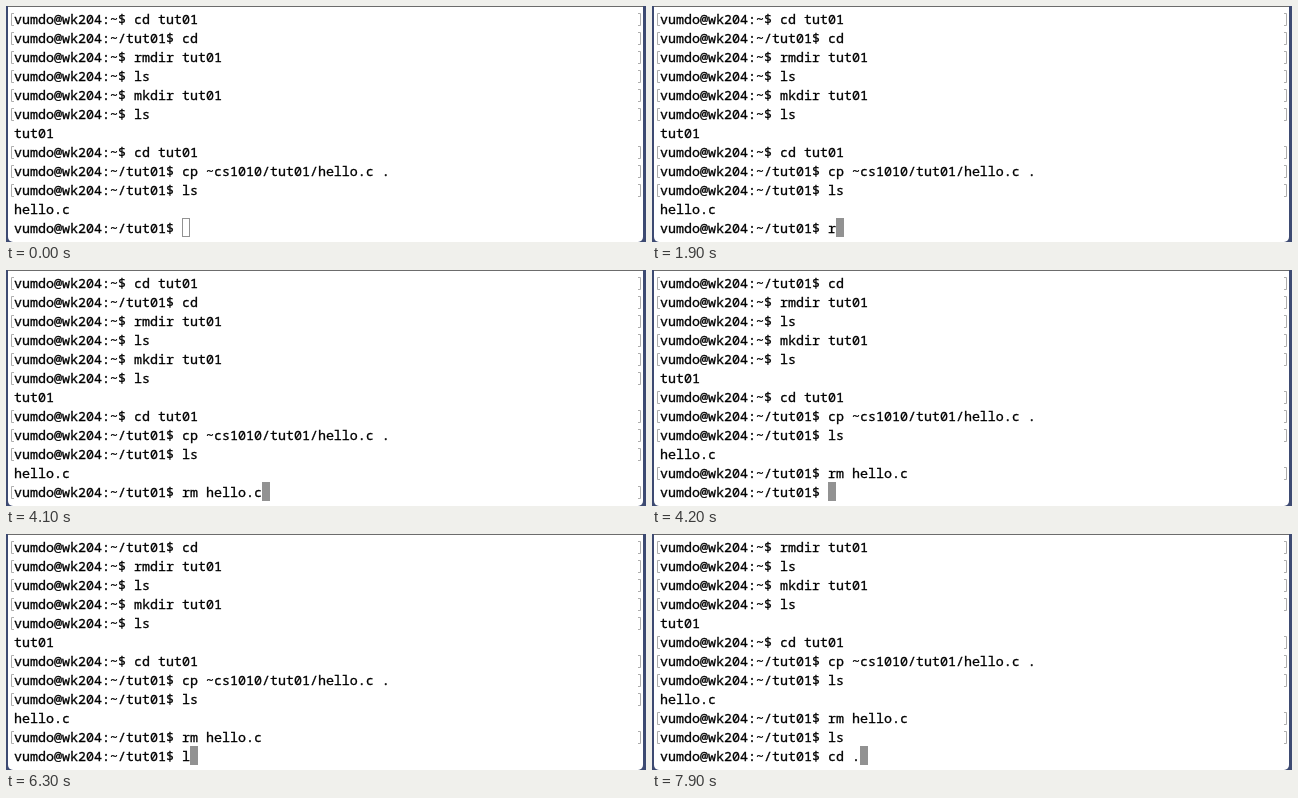
Animation, 640 px wide and 236 px high, one loop 8000 ms. Source, as an HTML page with a canvas:

```html
<!DOCTYPE html>
<html lang="en">
<head>
<meta charset="utf-8">
<title>Terminal session</title>
<style>
  html, body { margin: 0; width: 100%; height: 100%; overflow: hidden; }
  canvas { display: block; width: 640px; height: 236px; }
</style>
</head>
<body>
<canvas id="screen" width="640" height="236"></canvas>
<script>
const ctx = document.getElementById('screen').getContext('2d');
const LOOP = 8000, CELL = 8, ROW = 19, LEFT = 8, TOP = 3, ROWS = 12;
const HOST = 'vumdo@wk204:';
const home = cmd => ({ text: `${HOST}~$ ${cmd}`, marked: true });
const tut = cmd => ({ text: `${HOST}~/tut01$ ${cmd}`, marked: true });
const out = text => ({ text, marked: false });

const history = [
  home('cd tut01'), tut('cd'), home('rmdir tut01'), home('ls'),
  home('mkdir tut01'), home('ls'), out('tut01'), home('cd tut01'),
  tut('cp ~cs1010/tut01/hello.c .'), tut('ls'), out('hello.c')
];

// [time, key]: '<' erases, '!' accepts the line, '\n' opens a new prompt
const keys = [
  [1900, 'r'], [2000, 'm'], [2200, ' '], [2400, 'h'], [2600, 'e'],
  [2900, 'l'], [3100, 'l'], [3300, 'o'], [3600, '.'], [3800, 'c'],
  [4100, '!'], [4200, '\n'],
  [5400, 's'], [6000, '<'], [6300, 'l'], [6400, 's'], [6500, '\n'],
  [7500, 'c'], [7600, 'd'], [7800, ' '], [7900, '.']
];
const FOCUS_TIME = 100;

function sessionAt(time) {
  const lines = history.slice();
  let input = '', accepted = false;
  for (const [at, key] of keys) {
    if (at > time) break;
    if (key === '<') input = input.slice(0, -1);
    else if (key === '!') accepted = true;
    else if (key === '\n') {
      lines.push(tut(input));
      input = '';
      accepted = false;
    } else input += key;
  }
  lines.push({ ...tut(input), marked: accepted });
  return lines.slice(-ROWS);
}

function drawWindow() {
  ctx.fillStyle = '#3d4a72';
  ctx.fillRect(0, 0, 640, 236);
  ctx.fillStyle = '#fff';
  ctx.beginPath();
  ctx.roundRect(2, 0, 635, 236, [0, 0, 5, 5]);
  ctx.fill();
  ctx.fillStyle = '#6c6c6c';
  ctx.fillRect(2, 0, 635, 1);
}

function drawBracket(x, top, dir) {
  ctx.strokeStyle = '#adadad';
  ctx.lineWidth = 1;
  ctx.beginPath();
  ctx.moveTo(x + 2.5 * dir, top + 4.5);
  ctx.lineTo(x, top + 4.5);
  ctx.lineTo(x, top + 16.5);
  ctx.lineTo(x + 2.5 * dir, top + 16.5);
  ctx.stroke();
}

function drawCursor(column, top, focused) {
  const x = LEFT + column * CELL;
  if (focused) {
    ctx.fillStyle = '#929292';
    ctx.fillRect(x, top, CELL, ROW);
  } else {
    ctx.strokeStyle = '#929292';
    ctx.lineWidth = 1;
    ctx.strokeRect(x + 0.5, top + 0.5, CELL - 1, ROW - 1);
  }
}

// A hairline outline gives the text its slightly heavier weight.
function drawText(text, x, y) {
  ctx.fillStyle = ctx.strokeStyle = '#000';
  ctx.lineWidth = 0.3;
  ctx.fillText(text, x, y);
  ctx.strokeText(text, x, y);
}

function draw(time) {
  drawWindow();
  ctx.font = '13.333px "Noto Sans Mono", "DejaVu Sans Mono", monospace';
  ctx.textBaseline = 'alphabetic';
  const lines = sessionAt(time);
  lines.forEach(({ text, marked }, i) => {
    const top = TOP + i * ROW;
    if (marked) {
      drawBracket(5.5, top, 1);
      drawBracket(634.5, top, -1);
    }
    if (i === lines.length - 1) drawCursor(text.length, top, time >= FOCUS_TIME);
    drawText(text, LEFT, top + 15);
  });
}

function tick() {
  draw(performance.now() % LOOP);
  requestAnimationFrame(tick);
}
tick();
</script>
</body>
</html>
```
